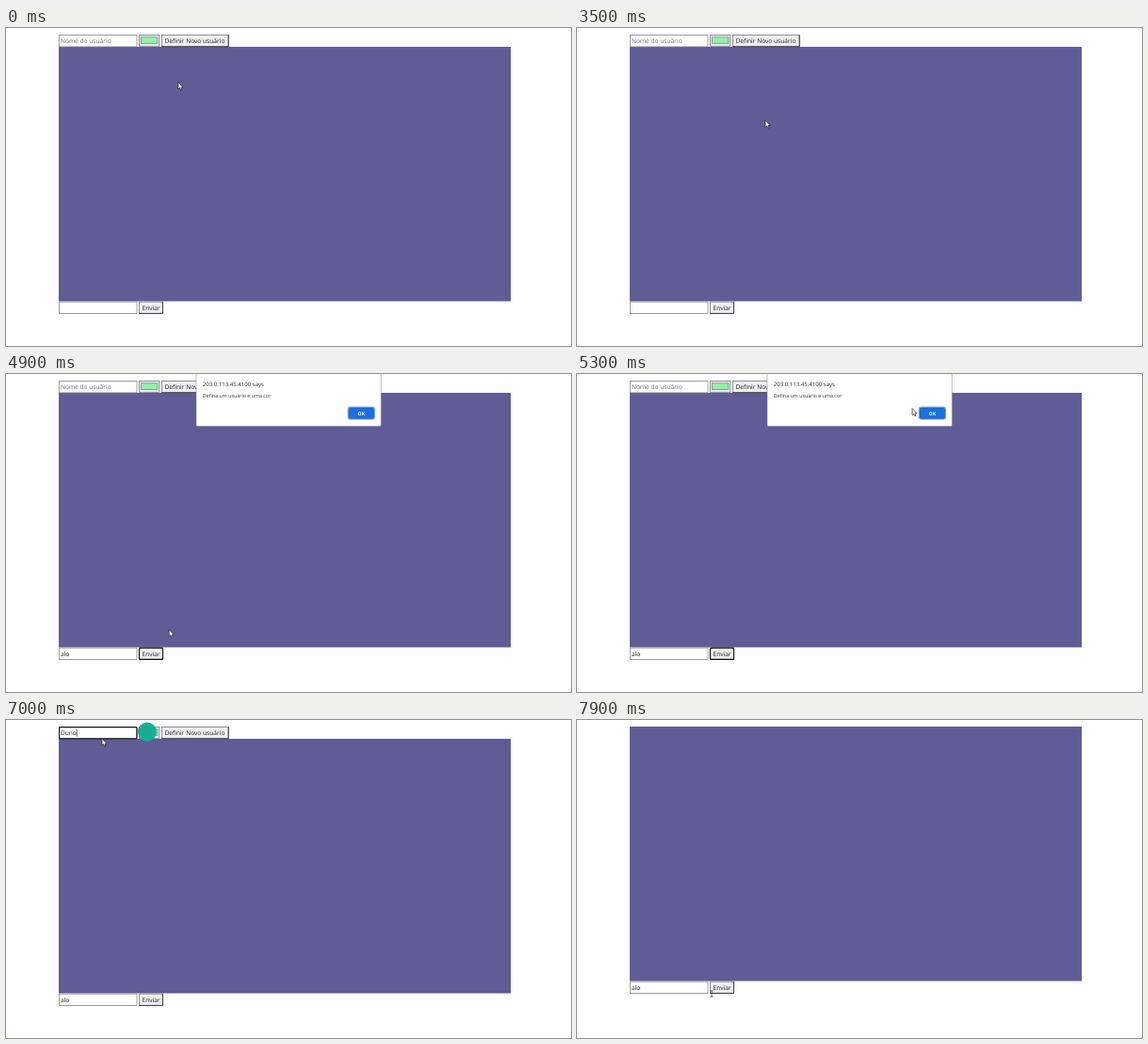
Write an HTML page that moves like this. It is 600x338 px and loops after 8 s.

```html
<!DOCTYPE html>
<html lang="pt">
<head>
<meta charset="utf-8">
<style>
  html, body { margin: 0; width: 100%; height: 100%; overflow: hidden; background: #fefdff; }
  svg { display: block; width: 600px; height: 338px; }
  text { font: 6.63px "Open Sans", "Noto Sans", sans-serif; fill: #222; text-rendering: geometricPrecision; }
  .box { fill: #fff; stroke: #858488; stroke-width: .8; }
  .button { fill: #efeff1; stroke: #77767b; stroke-width: .8; }
  .edge { fill: none; stroke: #34333d; stroke-width: .9; }
  .focus { fill: none; stroke: #15151d; stroke-width: 1.2; }
  .caret { stroke: #111; stroke-width: .7; }
  .hint { fill: #6d6c72; }
  #alert .title { font-size: 6.05px; fill: #26272b; }
  #alert .body { font-size: 5.35px; fill: #2c2d31; }
  #alert .ok { font-size: 5.1px; font-weight: 700; fill: #fff; }
</style>
</head>
<body>
<svg viewBox="0 0 600 338">
  <defs>
    <rect id="box" class="box" x="56.5" y=".5" width="82.5" height="12.4"/>
    <rect id="ring" class="focus" x="56.6" y=".6" width="82.3" height="12.2" rx="1"/>
    <path id="bar" class="caret" d="M0 2.6v8"/>
  </defs>
  <g id="page">
    <rect x="56" y="20" width="480" height="270.5" fill="#605c95"/>
    <g transform="translate(0 290.6)">
      <use href="#box"/>
      <use id="messageFocus" href="#ring"/>
      <text id="message" x="57.9" y="9"></text>
      <use id="messageCaret" href="#bar"/>
      <rect class="button" x="141.5" y=".5" width="25" height="12.3"/>
      <path class="edge" d="M141.2 12.8h25.3V.4"/>
      <rect id="sendFocus" class="focus" x="141.5" y=".6" width="25" height="12.2" rx="1.2"/>
      <text x="144.5" y="9">Enviar</text>
    </g>
  </g>
  <g id="userRow" transform="translate(0 7)">
    <use href="#box"/>
    <use id="nameFocus" href="#ring"/>
    <text id="hint" class="hint" x="57.9" y="9.3">Nome do usuário</text>
    <text id="name" x="57.9" y="9.3"></text>
    <use id="nameCaret" href="#bar"/>
    <rect class="button" x="141.4" y=".5" width="21.4" height="11.8"/>
    <rect x="143.3" y="2.8" width="17.6" height="6.8" fill="#90f2a5" stroke="#777b7b" stroke-width=".7"/>
    <circle id="badge" cx="149.9" cy="5.6" r="10" fill="#16ae93"/>
    <rect class="button" x="165.4" y=".5" width="70.8" height="12.3"/>
    <path class="edge" d="M165 12.8h71.2V.4"/>
    <text x="168.5" y="9.3">Definir Novo usuário</text>
  </g>
  <g id="alert">
    <rect x="202" y="-4" width="196.3" height="59.6" rx="1.5" fill="#fff" stroke="#77749c" stroke-width=".5"/>
    <text class="title" x="208.8" y="13">203.0.113.45:4100 says</text>
    <text class="body" x="208.8" y="25.4">Defina um usuário e uma cor</text>
    <rect x="362.6" y="34.5" width="29.4" height="14.2" rx="2.4" fill="#8db9f4"/>
    <rect x="364" y="35.9" width="26.6" height="11.4" rx="1.6" fill="#1b6fe0" stroke="#174f9f" stroke-width=".6"/>
    <text class="ok" x="377.3" y="43.5" text-anchor="middle">OK</text>
  </g>
  <path id="arrow" d="M0 0V7.2L1.7 5.8L2.8 8.3L4 7.8L2.9 5.3H5Z" fill="#fff" stroke="#15151c" stroke-width=".65" stroke-linejoin="round"/>
  <path id="beam" d="M-1.5-3.1H1.5M0-3.1V3.1M-1.5 3.1H1.5" fill="none" stroke="#24242b" stroke-width=".7"/>
</svg>
<script>
  const LOOP = 8000, STEP = 100;
  const $ = id => document.getElementById(id);
  const clamp = v => Math.min(1, Math.max(0, v));
  const smooth = u => u * u * (3 - 2 * u);

  const rest = { x: 183, y: 57.8 };
  const glides = [
    { from: 3400, to: 3500, x: 200, y: 98.2 },
    { from: 3500, to: 4000, x: 113, y: 302.2 },  // message field
    { from: 4500, to: 4700, x: 152, y: 299 },    // send button
    { from: 4800, to: 5300, x: 356, y: 36.5 },   // alert
    { from: 5300, to: 5400, x: 376, y: 42 },     // OK
    { from: 5400, to: 5700, x: 202, y: 301.5 },
    { from: 5700, to: 6100, x: 102, y: 19.8 },   // name field
    { from: 7000, to: 7400, x: 200, y: 14 },     // define button
    { from: 7600, to: 7900, x: 143, y: 291 }
  ];

  function pointer(t) {
    return glides.reduce((p, g) => {
      const u = smooth(clamp((t - g.from) / (g.to - g.from)));
      return { x: p.x + (g.x - p.x) * u, y: p.y + (g.y - p.y) * u };
    }, rest);
  }

  const within = (t, a, b) => t >= a && t < b;
  const show = (id, on) => $(id).style.display = on ? "" : "none";
  const move = (id, x, y) => $(id).setAttribute("transform", `translate(${x} ${y})`);
  const typed = (word, start, pace, t) =>
    word.slice(0, Math.max(0, Math.floor((t - start) / pace) + 1));

  function field(id, text, focused) {
    const label = $(id);
    if (label.textContent !== text) label.textContent = text;
    show(id + "Focus", focused);
    show(id + "Caret", focused);
    move(id + "Caret", 58.2 + (text ? label.getComputedTextLength() : 0), 0);
  }

  function draw(t) {
    const name = typed("Duno", 6400, 120, t);
    const onMessage = within(t, 4000, 4700);
    const defined = t >= 7700;
    field("message", typed("alo", 4200, 150, t), onMessage);
    field("name", name, within(t, 6100, 7500));
    show("hint", !name);
    show("badge", t >= 6800);
    show("sendFocus", within(t, 4700, 6100));
    show("alert", within(t, 4800, 5500));
    show("userRow", !defined);
    move("page", 0, defined ? -13 : 0);

    const { x, y } = pointer(t);
    const beam = onMessage || within(t, 6100, 6900) || t >= 7900;
    show("beam", beam);
    show("arrow", !beam);
    move(beam ? "beam" : "arrow", x, y);
  }

  function tick() {
    const t = performance.now() % LOOP;
    draw(t - t % STEP);
    requestAnimationFrame(tick);
  }
  tick();
</script>
</body>
</html>
```
